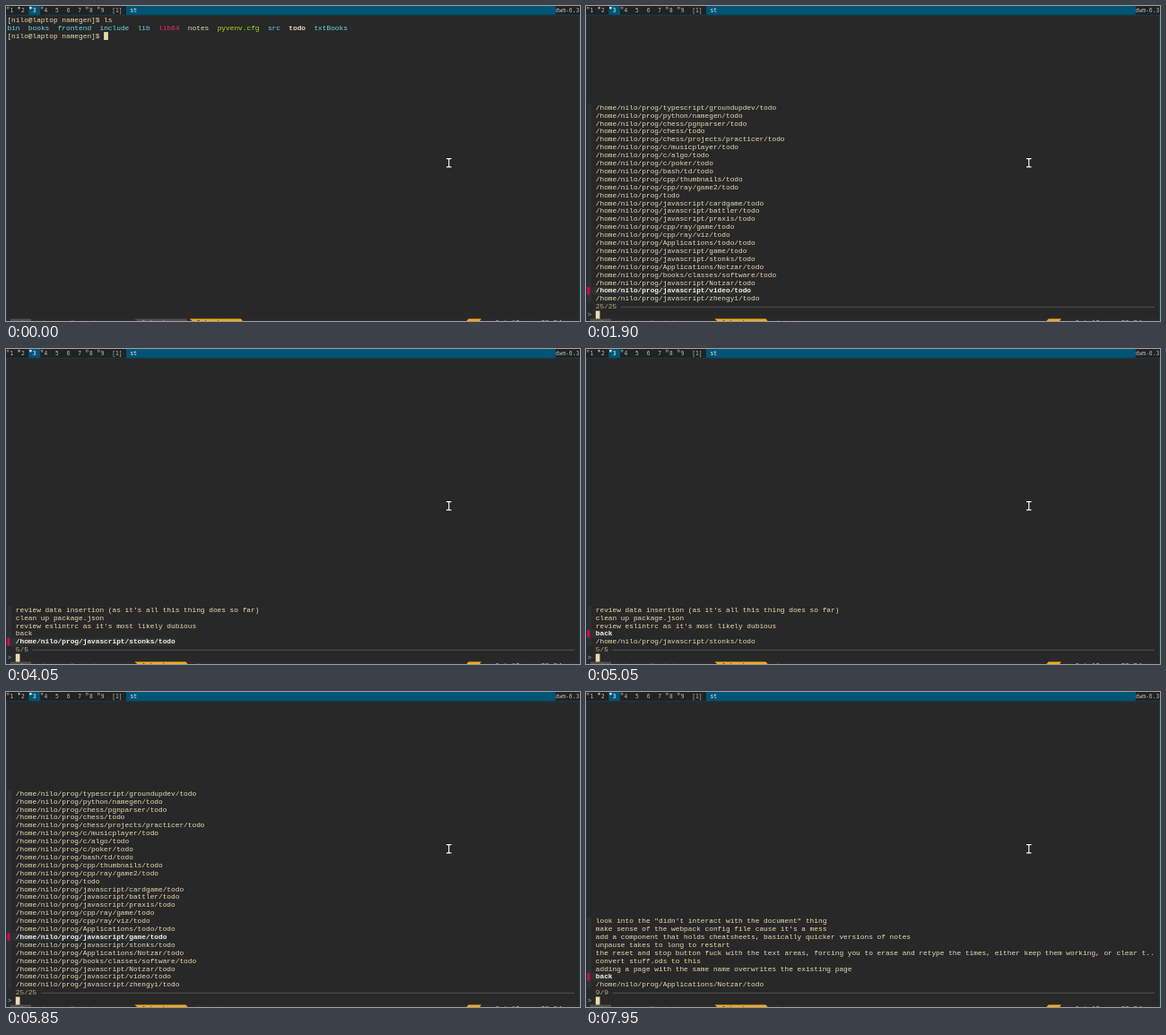
Animation, 640 px wide and 352 px high, one loop 8000 ms. Source, as an HTML page with a canvas:

```html
<!DOCTYPE html>
<html lang="en">
<head>
<meta charset="utf-8">
<title>Todo picker</title>
<style>
  html, body { margin: 0; width: 100%; height: 100%; overflow: hidden; background: #282828; }
  canvas { display: block; width: 640px; height: 352px; }
</style>
</head>
<body>
<canvas id="stage" width="640" height="352"></canvas>
<script>
const LOOP = 8000;
const ctx = document.getElementById('stage').getContext('2d');

// The desktop is laid out at 1366 px wide and scaled to the stage.
const W = 1366, SCALE = 640 / W;
const CELL_W = 10, CELL_H = 19, LEFT = 3, TOP = 24, BAR = 21;
const TERM_FONT = '16.67px "Liberation Mono", monospace';
const BAR_FONT = '13.33px "DejaVu Sans Mono", monospace';
const C = {
  bg: '#282828', fg: '#ebdbb2', bar: '#222222', accent: '#005577', dim: '#bbbbbb',
  cyan: '#66d9ef', red: '#f92652', green: '#a6e22e', gutter: '#303030',
  pointer: '#d7005f', bold: '#f2f0e6', info: '#afaf87', line: '#5f5f5f',
  prompt: '#87afd7', amber: '#f5a91c', grey: '#504d4a'
};

const HOME = '/home/nilo/prog/';
const path = p => HOME + p + 'todo';
const projects = [
  'typescript/groundupdev/', 'python/namegen/', 'chess/pgnparser/', 'chess/',
  'chess/projects/practicer/', 'c/musicplayer/', 'c/algo/', 'c/poker/', 'bash/td/',
  'cpp/thumbnails/', 'cpp/ray/game2/', '', 'javascript/cardgame/', 'javascript/battler/',
  'javascript/praxis/', 'cpp/ray/game/', 'cpp/ray/viz/', 'Applications/todo/',
  'javascript/game/', 'javascript/stonks/', 'Applications/Notzar/',
  'books/classes/software/', 'javascript/Notzar/', 'javascript/video/', 'javascript/zhengyi/'
].map(path);
const stonks = [
  "review data insertion (as it's all this thing does so far)",
  'clean up package.json',
  "review eslintrc as it's most likely dubious",
  'back',
  path('javascript/stonks/')
];
const notzar = [
  'look into the "didn\'t interact with the document" thing',
  "make sense of the webpack config file cause it's a mess",
  'add a component that holds cheatsheets, basically quicker versions of notes',
  'unpause takes to long to restart',
  'the reset and stop button fuck with the text areas, forcing you to erase and retype the times, either keep them working, or clear t..',
  'convert stuff.ods to this',
  'adding a page with the same name overwrites the existing page',
  'back',
  path('Applications/Notzar/')
];

// [start ms, list, selected item counted from the bottom]
const steps = [
  [1350, projects, 0], [1750, projects, 1], [1950, projects, 2], [2150, projects, 3],
  [2300, projects, 4], [2450, projects, 5], [3000, stonks, 0], [4850, stonks, 1],
  [5200, projects, 0], [5700, projects, held], [7500, notzar, 0], [7850, notzar, 1]
];

// Arrow key held up past the wanted row, then back down to it.
function held(ms) {
  const n = Math.floor(ms / 28) + 1;
  return n <= 15 ? n : Math.max(4, 30 - n);
}

const colX = c => LEFT + c * CELL_W;
const rowY = r => TOP + r * CELL_H;

function rect(x, y, w, h, color) {
  ctx.fillStyle = color;
  ctx.fillRect(x, y, w, h);
}

function poly(color, ...pts) {
  ctx.fillStyle = color;
  ctx.beginPath();
  pts.forEach(([x, y]) => ctx.lineTo(x, y));
  ctx.fill();
}

function write(text, col, row, color = C.fg, bold = false) {
  ctx.font = (bold ? 'bold ' : '') + TERM_FONT;
  ctx.fillStyle = color;
  ctx.fillText(text, colX(col), rowY(row) + 14);
}

function cursor(col, row) {
  rect(colX(col), rowY(row), CELL_W, CELL_H, C.fg);
}

function drawBar() {
  rect(0, 0, W, BAR, C.bar);
  ctx.font = BAR_FONT;
  const label = (s, x, color) => { ctx.fillStyle = color; ctx.fillText(s, x, 16); };
  for (let i = 0; i < 9; i++) {
    const x = i * 27, active = i === 2, color = active ? '#eeeeee' : C.dim;
    if (active) rect(x, 0, 27, BAR, C.accent);
    if (i < 4 || i > 6) {
      if (active) rect(x + 2, 2, 5, 5, color);
      else {
        ctx.strokeStyle = color;
        ctx.lineWidth = 1;
        ctx.strokeRect(x + 2.5, 2.5, 4, 4);
      }
    }
    label(i + 1, x + 9.5, color);
  }
  label('[1]', 252.5, C.dim);
  rect(286, 0, 1022, BAR, C.accent);
  label('st', 295.5, '#eeeeee');
  label('dwm-6.3', 1308, C.dim);
}

function drawStatus(firstTab) {
  const y = rowY(38), end = y + 6;
  const tab = (x, color) =>
    poly(color, [x, y], [x + 122, y], [x + 127, end], [x + 7, end]);
  rect(LEFT, y, W - 2 * LEFT, 6, '#2d2b2a');
  rect(10, y, 50, 6, C.grey);
  write('main', 1, 38, C.dim);
  write('~/prog: 2 windows', 7, 38, '#74564a');
  tab(306, firstTab ? C.amber : C.grey);
  if (!firstTab) tab(437, C.amber);
  write('1 bash', 32, 38, firstTab ? C.bg : C.dim);
  write('2 bash', 45, 38, firstTab ? C.grey : C.bg);
  poly(C.amber, [1101, y], [1131, y], [1127, end], [1095, end]);
  write('fri 12 aug 20:54', 116, 38, C.dim);
}

function drawListing() {
  const prompt = '[nilo@laptop namegen]$ ';
  write(prompt + 'ls', 0, 0);
  const colors = { lib64: C.red, notes: C.fg, 'pyvenv.cfg': C.green, todo: C.fg };
  let col = 0;
  for (const name of 'bin books frontend include lib lib64 notes pyvenv.cfg src todo txtBooks'.split(' ')) {
    write(name, col, 1, colors[name] || C.cyan, name === 'todo');
    col += name.length + 2;
  }
  write(prompt, 0, 2);
  cursor(prompt.length, 2);
}

function drawHome(t) {
  const prompt = '[nilo@laptop ~]$ ', typed = t >= 850 ? 'td' : '';
  write(prompt + 'td', 0, 0);
  write(prompt + 'td', 0, 1);
  write(prompt + typed, 0, 2);
  if (t < 1150) cursor(prompt.length + typed.length, 2);
  else cursor(0, 3);
}

function drawPicker(items, selected) {
  const n = items.length;
  items.forEach((item, i) => {
    const row = 36 - n + i, on = n - 1 - i === selected;
    rect(colX(0), rowY(row), CELL_W, CELL_H, C.gutter);
    if (on) {
      rect(colX(1), rowY(row), (item.length + 1) * CELL_W, CELL_H, C.gutter);
      rect(colX(0), rowY(row), 6, CELL_H, C.pointer);
    }
    write(item, 2, row, on ? C.bold : C.fg, on);
  });
  const count = n + '/' + n, from = colX(count.length + 3);
  write(count, 2, 36, C.info);
  rect(from, rowY(36) + 9, colX(135) - from, 1.5, C.line);
  write('>', 0, 37, C.prompt);
  cursor(2, 37);
}

function drawMouse() {
  ctx.beginPath();
  ctx.moveTo(1048, 364); ctx.lineTo(1060, 364);
  ctx.moveTo(1054, 364); ctx.lineTo(1054, 384);
  ctx.moveTo(1048, 384); ctx.lineTo(1060, 384);
  for (const [width, color] of [[6, '#161616'], [2.6, '#ffffff']]) {
    ctx.lineWidth = width;
    ctx.strokeStyle = color;
    ctx.stroke();
  }
}

function draw(t) {
  ctx.setTransform(SCALE, 0, 0, SCALE, 0, 0);
  rect(0, 0, W, 752, C.accent);
  rect(1, BAR + 1, W - 2, 731, C.bg);
  drawBar();
  drawStatus(t >= 50);
  if (t < 50) drawListing();
  else if (t < steps[0][0]) drawHome(t);
  else {
    const [start, items, pick] = steps.filter(s => s[0] <= t).pop();
    drawPicker(items, typeof pick === 'function' ? pick(t - start) : pick);
  }
  drawMouse();
}

const begin = performance.now();
function tick() {
  draw((performance.now() - begin) % LOOP);
  requestAnimationFrame(tick);
}
tick();
</script>
</body>
</html>
```
